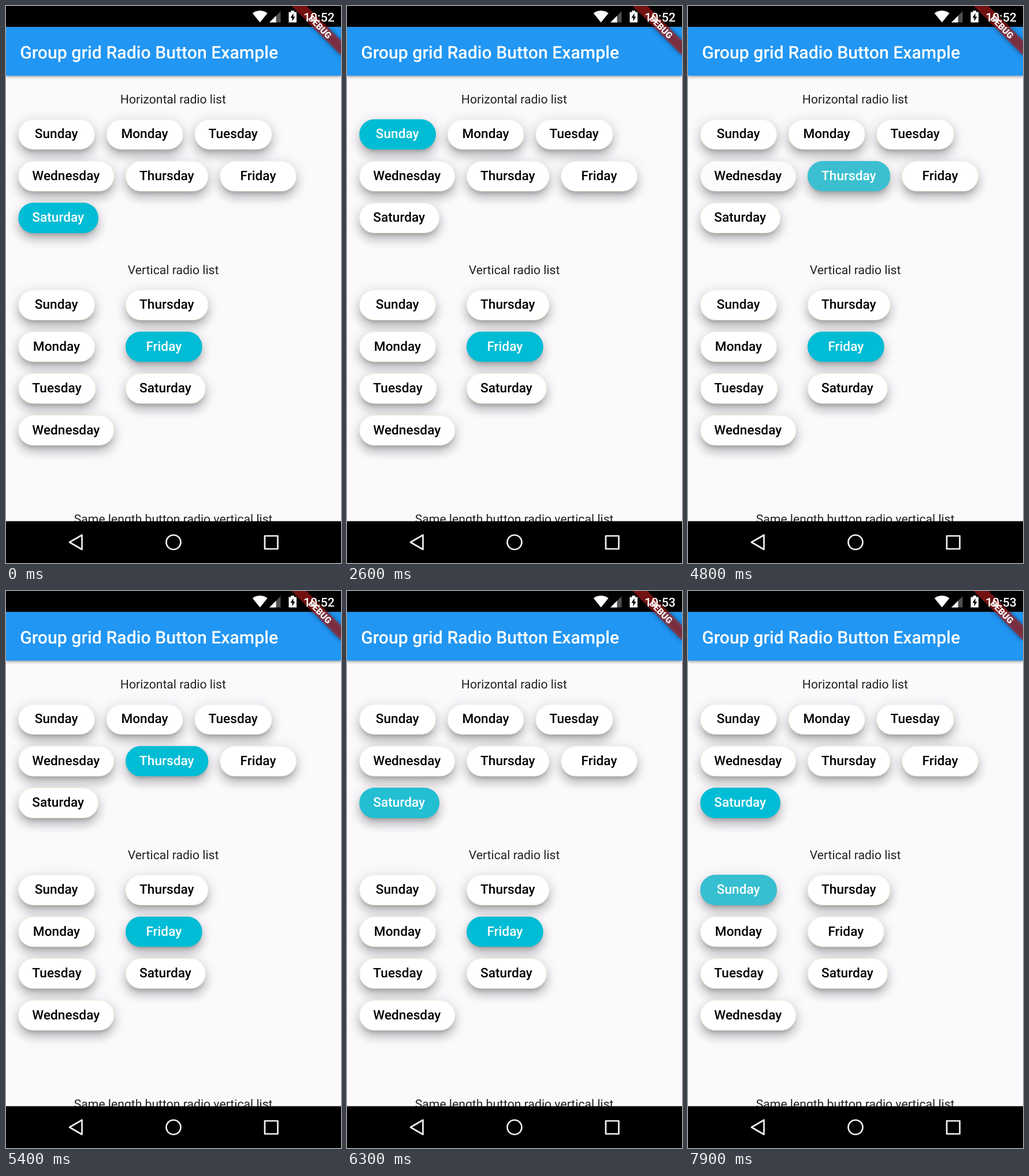
Animation, 580 px wide and 966 px high, one loop 8 s. Source, as an HTML page:

```html
<!DOCTYPE html>
<html lang="en">
<head>
<meta charset="utf-8">
<title>Radio buttons</title>
<style>
html, body { margin: 0; width: 100%; height: 100%; overflow: hidden; }
body { background: #fbf9fc; }
.stage { position: absolute; width: 384px; height: 640px; transform-origin: 0 0; transform: scale(calc(580 / 384), calc(966 / 640));
  font: 14px/16px Roboto, sans-serif; color: #212121; white-space: nowrap; text-rendering: geometricPrecision; }
.stage > *, svg { position: absolute; left: 0; top: 0; }
.head { width: 384px; text-align: center; }
.head span, .btn span { display: inline-block; text-align: left; }
.bar { top: 24px; width: 368px; height: 55.5px; padding: .5px 0 0 16px; background: #2196f3; color: #fff; font-size: 20px; font-weight: 500; line-height: 56px;
  box-shadow: 0 1.5px 3px rgba(0,0,0,.3), 0 1px 4px rgba(0,0,0,.12); }
.group { left: 14px; width: 356px; height: 179px; display: flex; flex-flow: row wrap; gap: 13px; align-items: flex-start; align-content: flex-start; }
.column { flex-direction: column; }
.btn { box-sizing: border-box; height: 35px; min-width: 88px; padding: 0 15px; border-radius: 18px; border: 1px solid; font-size: 15px; font-weight: 500; line-height: 33px; text-align: center;
  box-shadow: 0 5px 5px -3px rgba(0,0,0,.2), 0 8px 10px 1px rgba(0,0,0,.14), 0 3px 14px 2px rgba(0,0,0,.12); }
</style>
</head>
<body>
<div class="stage">
  <div class="head" style="top:100px"><span>Horizontal radio list</span></div>
  <div class="head" style="top:296px"><span>Vertical radio list</span></div>
  <div class="head" style="top:582px"><span>Same length button radio vertical list</span></div>
  <div class="group" style="top:130px"></div>
  <div class="group column" style="top:326px"></div>
  <div class="bar">Group grid Radio Button Example</div>
</div>
<svg width="580" height="966" viewBox="0 0 580 966" font-family="Roboto, sans-serif" text-rendering="geometricPrecision">
  <path d="M0 0H580V36.2H0ZM0 893.5H580V966H0Z"/>
  <g transform="translate(580 0) rotate(45)">
    <rect x="-60.4" y="42.3" width="120.8" height="18.1" opacity=".5" style="filter:blur(4px)"/>
    <rect x="-60.4" y="42.3" width="120.8" height="18.1" fill="#b71c1c" fill-opacity=".627"/>
    <text y="56.8" text-anchor="middle" font-size="15.4" font-weight="900" fill="#fff">DEBUG</text>
  </g>
  <g fill="#fff">
    <path transform="translate(426.3 4.6) scale(1.117)" d="M12 21.5L23.6 7C23.2 6.7 18.7 3 12 3S.8 6.7.4 7Z"/>
    <path d="M456 28.5L475.5 9V28.5Z" fill="#505050"/>
    <path d="M456 28.5L467.5 17V28.5Z"/>
    <path d="M489.5 10.5H493.5V8H499V10.5H503V28.5H489.5Z"/>
    <path d="M497.5 12.5L492.5 20.5H495.5V26.5L500.5 18.5H497.5Z" fill="#000"/>
    <text id="clock" x="515" y="26.7" font-size="21.2" font-weight="500">10:52</text>
  </g>
  <g fill="none" stroke="#f2f2f2" stroke-width="2.7" stroke-linejoin="round">
    <path d="M110 930L131.5 917.5V942.5Z"/>
    <circle cx="290" cy="930" r="12.5"/>
    <path d="M448 919H470.5V941.5H448Z"/>
  </g>
</svg>
<script>
const LOOP = 8000, PRESS = 100, FADE = 500, CLOCK_TICK = 5900;
const days = ['Sunday', 'Monday', 'Tuesday', 'Wednesday', 'Thursday', 'Friday', 'Saturday'];
const clock = document.getElementById('clock');

// taps[i] is the moment day i gets selected
function makeGroup(box, taps, first) {
  box.innerHTML = days.map(day => `<div class="btn"><span>${day}</span></div>`).join('');
  return { buttons: [...box.children], taps, first };
}

const [row, column] = document.querySelectorAll('.group');
const groups = [
  makeGroup(row, [2000, 3000, 3430, 4380, 4675, 5530, 6020], 6),
  makeGroup(column, [7740], 5)
];

// Labels take whole units of width
for (const label of document.querySelectorAll('span'))
  label.style.width = Math.ceil(parseFloat(getComputedStyle(label).width)) + 'px';

// Grey ink over a button: rises while pressed, fades once selected
function ink(age) {
  const level = age < 0 ? 1 + age / PRESS : 1 - age / FADE;
  return 0.4 * Math.max(0, level);
}

function draw(t) {
  for (const { buttons, taps, first } of groups) {
    const done = taps.filter(tap => t >= tap).length;
    const chosen = done ? done - 1 : first;
    buttons.forEach((el, i) => {
      const on = i === chosen;
      const tint = `rgba(200,200,200,${i in taps ? ink(t - taps[i]).toFixed(3) : 0})`;
      el.style.color = on ? '#fff' : '#000';
      el.style.borderColor = on ? 'transparent' : '#f5f5e6';
      el.style.background = `linear-gradient(${tint},${tint}) border-box ${on ? '#00bcd4' : '#fff'}`;
    });
  }
  clock.textContent = t < CLOCK_TICK ? '10:52' : '10:53';
}

const start = performance.now();
(function frame() {
  draw((performance.now() - start) % LOOP);
  requestAnimationFrame(frame);
})();
</script>
</body>
</html>
```
